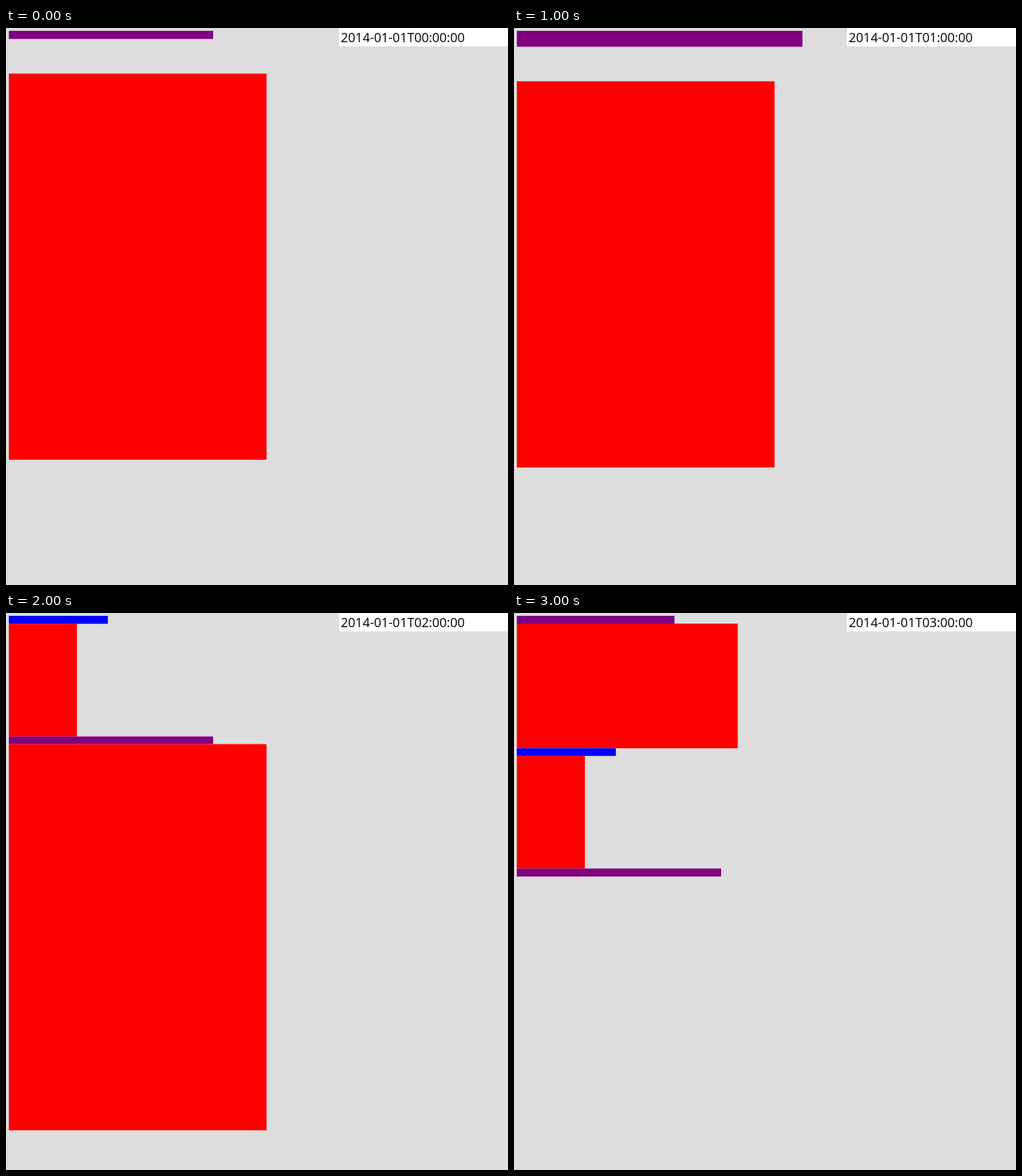
Write an HTML page that moves like this. It is 710 px wide and 788 px high and loops after 4 s.

```html
<!DOCTYPE html>
<html lang="en">
<head>
<meta charset="utf-8">
<title>Hourly blocks</title>
<style>
  html, body { margin: 0; width: 100%; height: 100%; overflow: hidden; background: #ddd; }
  svg { display: block; width: 710px; height: 788px; }
  text { font: 18px "Open Sans", "Noto Sans", sans-serif; fill: #000; }
  .red { fill: #f00; }
  .blue { fill: #00f; }
  .purple { fill: #800080; }
  .step { visibility: hidden; animation: show 4s step-end infinite; animation-delay: calc(var(--i) * 1s - 4s); }
  @keyframes show {
    0% { visibility: visible; }
    25%, 100% { visibility: hidden; }
  }
</style>
</head>
<body>
<svg viewBox="0 0 710 788">
  <rect width="710" height="788" fill="#ddd"/>
  <rect x="471" width="239" height="26" fill="#fff"/>
  <g class="step" style="--i:0">
    <rect class="purple" x="4" y="4" width="289" height="11.5"/>
    <rect class="red" x="4" y="64.5" width="364.5" height="546.3"/>
    <text x="473.5" y="20">2014-01-01T00:00:00</text>
  </g>
  <g class="step" style="--i:1">
    <rect class="purple" x="4" y="4" width="404" height="22.5"/>
    <rect class="red" x="4" y="75.4" width="364.5" height="546.3"/>
    <text x="473.5" y="20">2014-01-01T01:00:00</text>
  </g>
  <g class="step" style="--i:2">
    <rect class="blue" x="4" y="4" width="140" height="11.3"/>
    <rect class="red" x="4" y="15.3" width="96.3" height="159.4"/>
    <rect class="purple" x="4" y="174.7" width="289" height="10.8"/>
    <rect class="red" x="4" y="185.5" width="364.5" height="546.3"/>
    <text x="473.5" y="20">2014-01-01T02:00:00</text>
  </g>
  <g class="step" style="--i:3">
    <rect class="purple" x="4" y="4" width="223" height="11"/>
    <rect class="red" x="4" y="15" width="312.5" height="176.3"/>
    <rect class="blue" x="4" y="191.3" width="140" height="10.9"/>
    <rect class="red" x="4" y="202.2" width="96.3" height="159.3"/>
    <rect class="purple" x="4" y="361.5" width="289" height="11.3"/>
    <text x="473.5" y="20">2014-01-01T03:00:00</text>
  </g>
</svg>
</body>
</html>
```
